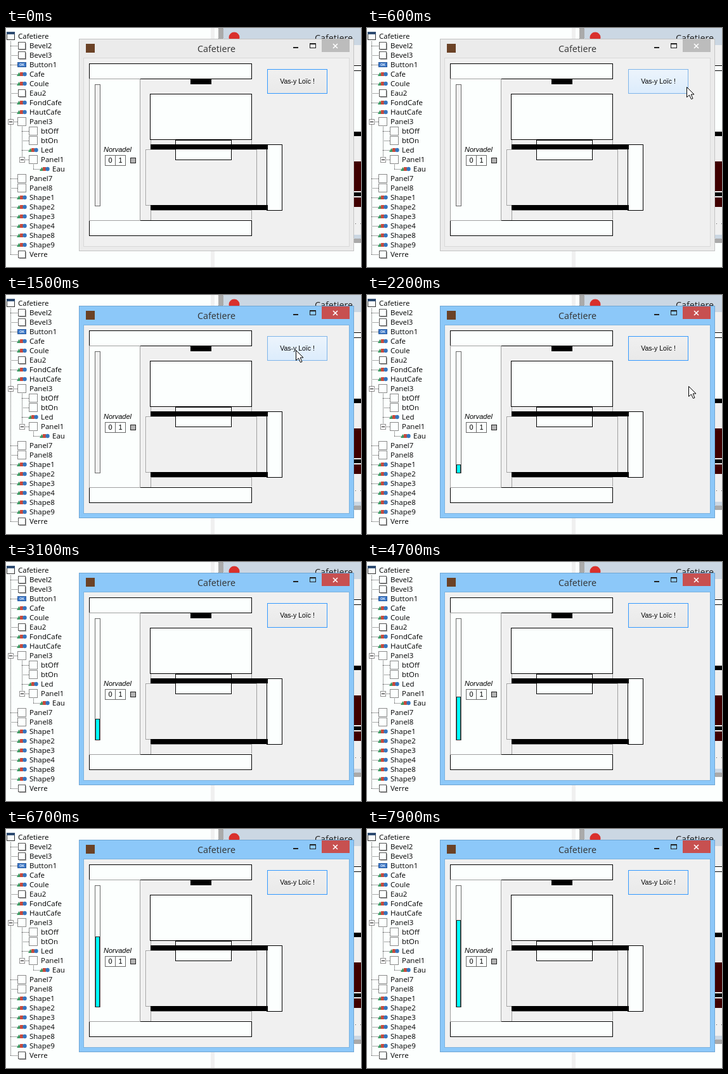
Recreate the animation shown at these times as an HTML page with a canvas. Size 560x378 px, loop 8000 ms.

```html
<!DOCTYPE html>
<html lang="fr">
<head>
<meta charset="utf-8">
<style>
html, body { margin: 0; width: 100%; height: 100%; overflow: hidden; background: #fff; }
canvas { display: block; }
</style>
</head>
<body>
<canvas id="stage" width="560" height="378"></canvas>
<script>
const ctx = document.getElementById('stage').getContext('2d');
const LOOP = 8000, TICK = 100;
const UI = '"Open Sans", "Noto Sans", sans-serif';
const ARIAL = '"Liberation Sans", Arial, sans-serif';
const PALE = '#fcfffe', FACE = '#f0f0f0', SHADOW = '#a0a0a0', BLACK = '#000';

function rect(x, y, w, h, fill) {
  ctx.fillStyle = fill;
  ctx.fillRect(x, y, w, h);
}

// Filled box with a one-pixel border inside its bounds
function box(x, y, w, h, fill, border = BLACK) {
  rect(x, y, w, h, border);
  rect(x + 1, y + 1, w - 2, h - 2, fill);
}

function text(str, x, y, font, color = BLACK, align = 'left') {
  ctx.font = font;
  ctx.fillStyle = color;
  ctx.textAlign = align;
  ctx.fillText(str, x, y);
}

function shape(points, fill, stroke) {
  ctx.beginPath();
  points.forEach(([x, y]) => ctx.lineTo(x, y));
  ctx.closePath();
  ctx.fillStyle = fill;
  ctx.fill();
  if (!stroke) return;
  ctx.strokeStyle = stroke;
  ctx.lineWidth = 1;
  ctx.stroke();
}

function disc(x, y, r, fill) {
  ctx.beginPath();
  ctx.arc(x, y, r, 0, 7);
  ctx.fillStyle = fill;
  ctx.fill();
}

function dotsX(x0, x1, y, step = 2) {
  for (let x = x0; x < x1; x += step) rect(x, y, 1, 1, '#555');
}

function dotsY(x, y0, y1) {
  for (let y = y0; y < y1; y += 2) rect(x, y, 1, 1, '#555');
}

function hatch(x, y, w, h) {
  rect(x, y, w, h, '#fff');
  for (let i = 0; i < h; i++) dotsX(x + i % 2, x + w, y + i);
}

// Component tree: name, icon, depth
const TREE = [
  ['Bevel2', 'bevel', 1], ['Bevel3', 'bevel', 1], ['Button1', 'button', 1],
  ['Cafe', 'shape', 1], ['Coule', 'shape', 1], ['Eau2', 'bevel', 1],
  ['FondCafe', 'shape', 1], ['HautCafe', 'shape', 1], ['Panel3', 'panel', 1],
  ['btOff', 'panel', 2], ['btOn', 'panel', 2], ['Led', 'shape', 2],
  ['Panel1', 'panel', 2], ['Eau', 'shape', 3],
  ['Panel7', 'panel', 1], ['Panel8', 'panel', 1],
  ...[1, 2, 3, 4, 8, 9].map(n => ['Shape' + n, 'shape', 1]),
  ['Verre', 'bevel', 1]
];

const ICONS = {
  bevel(x, y) {
    rect(x + 4, y - 4, 11, 11, '#999');
    box(x + 2, y - 6, 12, 12, PALE, '#555');
  },
  panel(x, y) {
    box(x + 1, y - 7, 14, 14, PALE, '#8a8a8a');
  },
  button(x, y) {
    box(x + 1, y - 4, 14, 8, '#3c78c8', '#2b5b9d');
    text('OK', x + 8, y + 2, 'bold 5px ' + ARIAL, '#fff', 'center');
  },
  shape(x, y) {
    shape([[x, y + 3], [x + 3.5, y - 3], [x + 7, y + 3]], '#3c9a62');
    rect(x + 5, y - 3, 5, 6, '#c84a3c');
    disc(x + 12.5, y, 3.2, '#3575bd');
  }
};

function expander(x, y) {
  box(x - 4, y - 4, 9, 9, '#fff', '#919191');
  rect(x - 2, y, 5, 1, BLACK);
}

function drawTree() {
  const font = '11.5px ' + UI;
  rect(0, 0, 323, 378, PALE);
  box(1, 6, 13, 13, PALE, '#333');
  rect(1, 6, 13, 4, '#2c4a70');
  text('Cafetiere', 19, 17, font);
  dotsY(7, 21, 358);
  dotsY(25, 156, 208);
  dotsY(43, 216, 223);
  TREE.forEach(([name, icon, depth], i) => {
    const x = depth * 18, y = 28 + i * 15;
    dotsX(x - 11, x, y);
    ICONS[icon](x - 1, y);
    text(name, x + 19, y + 4, font);
  });
  expander(7, 148);
  expander(25, 208);
}

// Form designer behind the running window
function drawBackdrop() {
  rect(323, 0, 237, 378, PALE);
  rect(323, 0, 6, 378, FACE);
  hatch(335, 0, 225, 340);
  rect(343, 0, 217, 27, '#cbd7e3');
  disc(360, 15, 8.5, '#d9302c');
  text('Cafetiere', 517, 21, '14.3px ' + UI, '#222', 'center');
  rect(549, 27, 11, 306, FACE);
  rect(549, 59, 11, 104, PALE);
  rect(549, 59, 11, 1, BLACK);
  rect(549, 67, 11, 1, BLACK);
  rect(549, 164, 11, 7, BLACK);
  rect(549, 211, 11, 72, '#400000');
  rect(549, 258, 11, 10, FACE);
  rect(549, 260, 11, 6, BLACK);
  dotsX(551, 560, 309, 8);
  rect(549, 327, 11, 6, '#cbd7e3');
}

function drawFrame(active) {
  const skin = active ? '#8cc8f9' : '#ebebeb';
  box(115, 17, 434, 336, skin, active ? '#6fa6d4' : '#c3c3c3');
  box(122, 47, 420, 299, FACE, active ? '#7db3df' : '#d9d9d9');
  rect(126, 25, 14, 14, '#6b4226');
  text('Cafetiere', 332, 38, '14.3px ' + UI, '#333', 'center');
  rect(453, 30, 8, 2, '#222');
  box(479, 24, 10, 8, skin, '#222');
  rect(479, 24, 10, 2, '#222');
  rect(498, 18, 44, 20, active ? '#c75050' : '#bcbcbc');
  ctx.strokeStyle = '#fff';
  ctx.lineWidth = 1.6;
  ctx.beginPath();
  ctx.moveTo(516, 25); ctx.lineTo(523, 32);
  ctx.moveTo(523, 25); ctx.lineTo(516, 32);
  ctx.stroke();
}

function drawButton(hover) {
  const g = ctx.createLinearGradient(0, 66, 0, 103);
  g.addColorStop(0, hover ? '#ecf4fc' : '#f0f0f0');
  g.addColorStop(1, hover ? '#dcecfc' : '#e9e9e9');
  box(412, 65, 95, 39, g, hover ? '#7eb4ea' : '#3399ff');
  text('Vas-y Loïc !', 459.5, 88, '10.5px ' + ARIAL, BLACK, 'center');
}

function drawMachine(t) {
  box(131, 56, 257, 25, PALE);
  box(131, 304, 257, 25, PALE);
  box(131, 80, 81, 225, PALE, SHADOW);
  rect(291, 81, 33, 8, BLACK);

  // Tank and rising water
  const level = Math.round(282 - (t - 1540) * 0.0217);
  const filling = t >= 1600;
  box(140, 89, 9, 193, filling ? PALE : FACE, '#696969');
  if (filling) box(141, level, 7, 282 - level, '#00ffff', level > 279 ? '#00ffff' : '#222');

  text('Norvadel', 154, 196, 'italic 11px ' + ARIAL);
  box(156, 201, 17, 17, PALE, '#696969');
  box(172, 201, 17, 17, PALE, '#696969');
  text('0', 164.5, 213, '11px ' + ARIAL, BLACK, 'center');
  text('1', 180.5, 213, '11px ' + ARIAL, BLACK, 'center');
  box(196, 205, 9, 9, '#b4b4b4', '#222');

  // Filter and jug
  box(228, 176, 160, 9, FACE, SHADOW);
  box(220, 192, 176, 89, FACE, SHADOW);
  rect(221, 193, 174, 1, '#fff');
  rect(221, 193, 1, 87, '#fff');
  box(267, 177, 89, 32, PALE);
  box(227, 104, 161, 73, PALE);
  box(228, 288, 160, 16, FACE, SHADOW);
  rect(229, 303, 159, 1, '#fff');
  box(411, 184, 25, 105, PALE);
  rect(228, 184, 185, 8, BLACK);
  rect(228, 280, 185, 8, BLACK);
}

// Pointer way-points: time, x, y
const PATH = [
  [100, 561, 99], [1000, 458, 88], [1200, 458, 88], [1300, 457, 87],
  [1600, 457, 87], [2300, 515, 154], [2800, 562, 175]
];

function pointerAt(t) {
  const i = PATH.findIndex(p => p[0] > t);
  if (i < 1) return [600, 0];
  const [t0, x0, y0] = PATH[i - 1], [t1, x1, y1] = PATH[i];
  const k = (t - t0) / (t1 - t0);
  return [Math.round(x0 + (x1 - x0) * k), Math.round(y0 + (y1 - y0) * k)];
}

function drawPointer(x, y) {
  const arrow = [[0, 0], [0, 16], [4, 12.5], [7, 19], [9.5, 18], [6.7, 11.5], [11.5, 11.5]];
  shape(arrow.map(([dx, dy]) => [x + dx + 0.5, y + dy + 0.5]), '#fff', BLACK);
}

function draw() {
  const now = performance.now() % LOOP;
  const t = Math.floor(now / TICK) * TICK;
  const [x, y] = pointerAt(t);
  drawTree();
  drawBackdrop();
  drawFrame(t >= 1500);
  drawMachine(t);
  drawButton(x >= 412 && x < 507 && y >= 65 && y < 104);
  if (t >= 200) drawPointer(x, y);
  requestAnimationFrame(draw);
}
draw();
</script>
</body>
</html>
```
